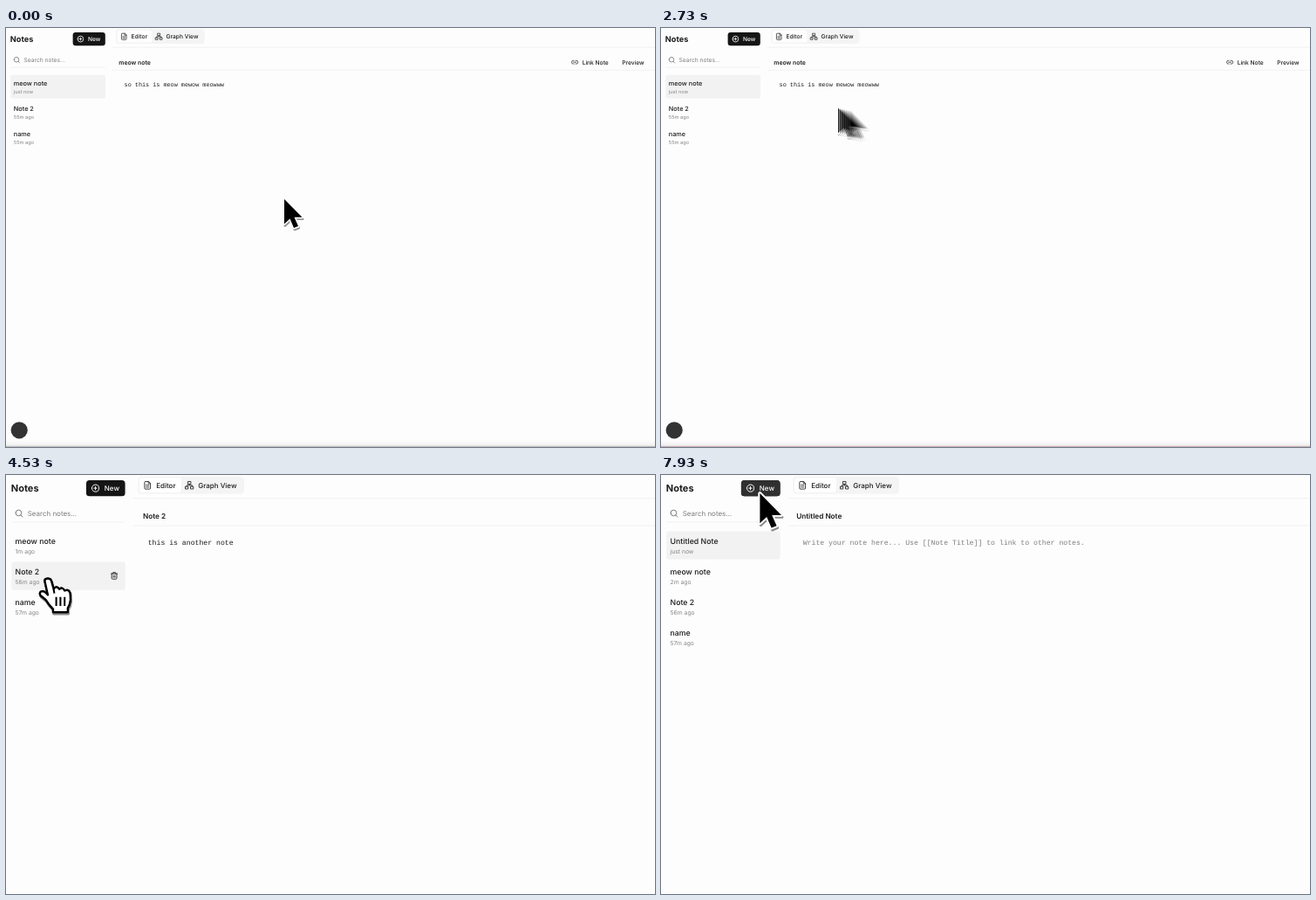
These frames come from a looping animation (744 by 480 pixels, 8 s). An HTML page:

```html
<!DOCTYPE html>
<html lang="en">
<head>
<meta charset="utf-8">
<title>Notes</title>
<style>
  html, body { margin: 0; width: 100%; height: 100%; overflow: hidden; background: #fdfdfd; }
  svg { display: block; width: 744px; height: 480px; }
  text { font: 500 6.65px Inter, sans-serif; fill: #1c1c1c; text-rendering: geometricPrecision; white-space: pre; }
  text.brand { font-size: 9.2px; font-weight: 700; }
  text.name { font-size: 7.3px; }
  text.age { font-size: 5.65px; font-weight: 400; fill: #858585; }
  text.title { font-size: 6.85px; font-weight: 600; }
  text.body { font: 400 6.8px "Liberation Mono", monospace; }
  text.hint { fill: #7d7d7d; }
  text.search { font-weight: 400; fill: #7d7d7d; }
  .icon { fill: none; stroke: #333; stroke-width: .8; stroke-linecap: round; stroke-linejoin: round; }
  .rule { stroke: #f0f0f0; stroke-width: .8; }
</style>
</head>
<body>
<svg viewBox="0 0 744 480">
  <defs>
    <linearGradient id="shade" x2="0" y2="1">
      <stop offset="0" stop-color="#fdfdfd"/><stop offset="1" stop-color="#efefef"/>
    </linearGradient>
    <g id="trash" class="icon">
      <path d="M-3-2H3M-2.4-2V2.3Q-2.4 3.2-1.5 3.2H1.5Q2.4 3.2 2.4 2.3V-2M-1.1-2V-3.2H1.1V-2M-.7-.2V1.6M.7-.2V1.6"/>
    </g>
    <g id="arrow" stroke-linejoin="round">
      <path id="tip" d="M0 0V28.5L6.5 22.5 11 33 16 31 11.5 20.8H20.5Z" fill="#000" opacity=".2" transform="translate(.8 2)" stroke="#000" stroke-width="2.5"/>
      <path d="M0 0V28.5L6.5 22.5 11 33 16 31 11.5 20.8H20.5Z" fill="#000" stroke="#fff" stroke-width="3" paint-order="stroke"/>
    </g>
    <g id="hand" stroke-linejoin="round">
      <path d="M-3 3Q-3 .8 0 .8 2.6 .8 3.3 3L5.5 11Q8 7 11 11 14 8.5 16 12.5 20 10.5 21.3 15L21.6 21Q21 26 19 29V33H5V30Q1 26-2 21L-7 17Q-9 13.5-5 13-3 13 0 16.5Z" fill="#000" opacity=".2" transform="translate(.6 1.6)" stroke="#000" stroke-width="2.5"/>
      <path d="M-3 3Q-3 .8 0 .8 2.6 .8 3.3 3L5.5 11Q8 7 11 11 14 8.5 16 12.5 20 10.5 21.3 15L21.6 21Q21 26 19 29V33H5V30Q1 26-2 21L-7 17Q-9 13.5-5 13-3 13 0 16.5Z" fill="#fff" stroke="#000" stroke-width="1.9"/>
      <path d="M8 18.5V27M12 18.5V27M16 18.5V27M5.5 11 6.2 15" fill="none" stroke="#000" stroke-width="1.7"/>
    </g>
  </defs>

  <g id="scene">
    <path class="rule" d="M122 22.3H744M122 48.4H744M5 45H114"/>
    <rect y="472" width="744" height="7" fill="url(#shade)"/>
    <rect id="edge" y="478.8" width="744" height="1.2"/>

    <text class="brand" x="4.8" y="16">Notes</text>
    <rect x="76.6" y="5" width="37.2" height="15.3" rx="3.2" fill="#151515"/>
    <rect id="newHover" x="76.6" y="5" width="37.2" height="15.3" rx="3.2" fill="#303030"/>
    <path class="icon" style="stroke:#fff" d="M82 12.6a3.4 3.4 0 1 0 6.8 0a3.4 3.4 0 1 0-6.8 0M83.9 12.6H86.9M85.4 11.1V14.1"/>
    <text x="94" y="15" style="fill:#fff">New</text>

    <path class="icon" style="stroke:#777" d="M9.2 36.2a2.8 2.8 0 1 0 5.6 0a2.8 2.8 0 1 0-5.6 0M14 38.3 15.7 40"/>
    <text class="search" x="20.6" y="39.4">Search notes...</text>

    <rect x="126" y="1.4" width="101.5" height="16.6" rx="3.5" fill="#f4f4f4"/>
    <rect x="127.6" y="2.8" width="39.8" height="13.8" rx="2.6" fill="#fefefe"/>
    <path class="icon" d="M136 6.2H133.2Q132.4 6.2 132.4 7V12.6Q132.4 13.4 133.2 13.4H137.2Q138 13.4 138 12.6V8.2ZV8.2H138M133.9 9.7H136.5M133.9 11.5H136.5"/>
    <text x="143.5" y="12.3">Editor</text>
    <path class="icon" d="M174 6.2H176.6V8.6H174ZM171.6 10.9H174V13.3H171.6ZM176.6 10.9H179V13.3H176.6ZM175.3 8.6V9.8M172.8 10.9V9.8H177.8V10.9"/>
    <text x="183.6" y="12.3">Graph View</text>

    <path class="icon" d="M651 37.3H650.4a1.9 1.9 0 0 0 0 3.8H651M653 37.3H653.8a1.9 1.9 0 0 1 0 3.8H653M650.6 39.2H653.6"/>
    <text x="660.7" y="41.6">Link Note</text>
    <text x="706.3" y="41.6">Preview</text>

    <g id="list"></g>
    <text id="title" class="title" y="41.7"></text>
    <text id="body" class="body" x="135.6" y="66.7"></text>
    <circle cx="15.2" cy="460.8" r="9.6" fill="#333"/>
    <g id="cursor"></g>
  </g>
</svg>

<script>
const LOOP = 8000, FADE = 130, ROW = 29.2, ROWS = 4, GHOSTS = 7, SHUTTER = 32;
const MEOW = 'so this is meow mewow meowww';
const HINT = 'Write your note here... Use [[Note Title]] to link to other notes.';

const listAt = (...ages) => ['meow note', 'Note 2', 'name'].map((name, i) => [name, ages[i]]);
const recent = listAt('just now', '55m ago', '55m ago');
const opened = listAt('1m ago', '56m ago', '57m ago');
const later = listAt('2m ago', '56m ago', '57m ago');

const states = [
  { at: 0, rows: recent, selected: 0, body: MEOW },
  { at: 3880, rows: opened, selected: 1, body: 'this is another note', x: 130.8 },
  { at: 5060, rows: later, selected: 2, body: 'this is a note' },
  { at: 6100, rows: later, selected: 0, body: MEOW },
  { at: 7250, rows: [['Untitled Note', 'just now'], ...later], selected: 0, body: HINT, hint: true },
];

// row, enter, leave
const hovers = [[0, 1120, 2470], [1, 3430, 4800], [2, 4800, 5550], [1, 5540, 5620], [0, 5620, 6730]];

// start, end, x, y
const moves = [
  [0, 1, 319, 196], [700, 1450, 93, 68.5], [2350, 3050, 300, 112], [3100, 3600, 40, 98],
  [4560, 4900, 42, 115], [5500, 6000, 36, 64], [6500, 7000, 94.5, 17.5],
];
const handTimes = [[1340, 2470], [3440, 6740]];

const $ = id => document.getElementById(id);
const clamp = v => Math.max(0, Math.min(1, v));
const ease = v => { v = clamp(v); return v * v * (3 - 2 * v); };

function add(parent, tag, attrs) {
  const el = document.createElementNS('http://www.w3.org/2000/svg', tag);
  for (const key in attrs) el.setAttribute(key, attrs[key]);
  return parent.appendChild(el);
}

const rows = Array.from({ length: ROWS }, (_, i) => {
  const g = add($('list'), 'g', { transform: `translate(0 ${i * ROW})` });
  return {
    g,
    back: add(g, 'rect', { x: 5.2, y: 53.7, width: 108.8, height: 26.8, rx: 2.6, fill: '#f2f2f2' }),
    name: add(g, 'text', { class: 'name', x: 8.8, y: 66 }),
    age: add(g, 'text', { class: 'age', x: 8.8, y: 75.1 }),
    trash: add(g, 'use', { href: '#trash', x: 103.4, y: 67 }),
  };
});

// Falling opacities average the copies, so a resting pointer stays solid.
const ghosts = Array.from({ length: GHOSTS }, (_, i) =>
  add($('cursor'), 'use', { opacity: 1 / (i + 1) }));

function pointerAt(t) {
  let [, , x, y] = moves[0];
  for (const [start, end, toX, toY] of moves) {
    const p = ease((t - start) / (end - start));
    x += (toX - x) * p;
    y += (toY - y) * p;
  }
  return [x, y];
}

function hoverOf(row, t) {
  return Math.max(0, ...hovers.filter(h => h[0] === row).map(([, enter, leave]) =>
    clamp(Math.min((t - enter) / FADE, 1 - (t - leave) / FADE))));
}

let shown;
function showState(state) {
  if (state === shown) return;
  shown = state;
  rows.forEach((row, i) => {
    const item = state.rows[i];
    row.g.style.display = item ? '' : 'none';
    if (item) [row.name.textContent, row.age.textContent] = item;
  });
  $('title').textContent = state.rows[state.selected][0];
  $('title').setAttribute('x', state.x || 129.3);
  $('body').textContent = state.body;
  $('body').classList.toggle('hint', !!state.hint);
}

function render(t) {
  const state = states.findLast(s => s.at <= t);
  showState(state);
  rows.forEach((row, i) => {
    const hover = hoverOf(i, t);
    row.back.setAttribute('opacity', i === state.selected ? 1 : hover * hover * .9);
    row.trash.setAttribute('opacity', hover);
  });
  $('newHover').setAttribute('opacity', clamp((t - 6850) / FADE));
  $('edge').setAttribute('fill', t < 270 ? '#bdbdbd' : '#cbb0b5');
  $('scene').setAttribute('transform', `scale(${1 + .2 * ease((t - 3400) / 730)})`);

  const shape = handTimes.some(([a, b]) => t >= a && t < b) ? '#hand' : '#arrow';
  ghosts.forEach((ghost, i) => {
    const [x, y] = pointerAt(t + SHUTTER * (i / (GHOSTS - 1) - .5));
    ghost.setAttribute('href', shape);
    ghost.setAttribute('x', x);
    ghost.setAttribute('y', y);
  });
}

const begin = performance.now();
function tick() {
  render((performance.now() - begin) % LOOP);
  requestAnimationFrame(tick);
}
tick();
</script>
</body>
</html>
```
